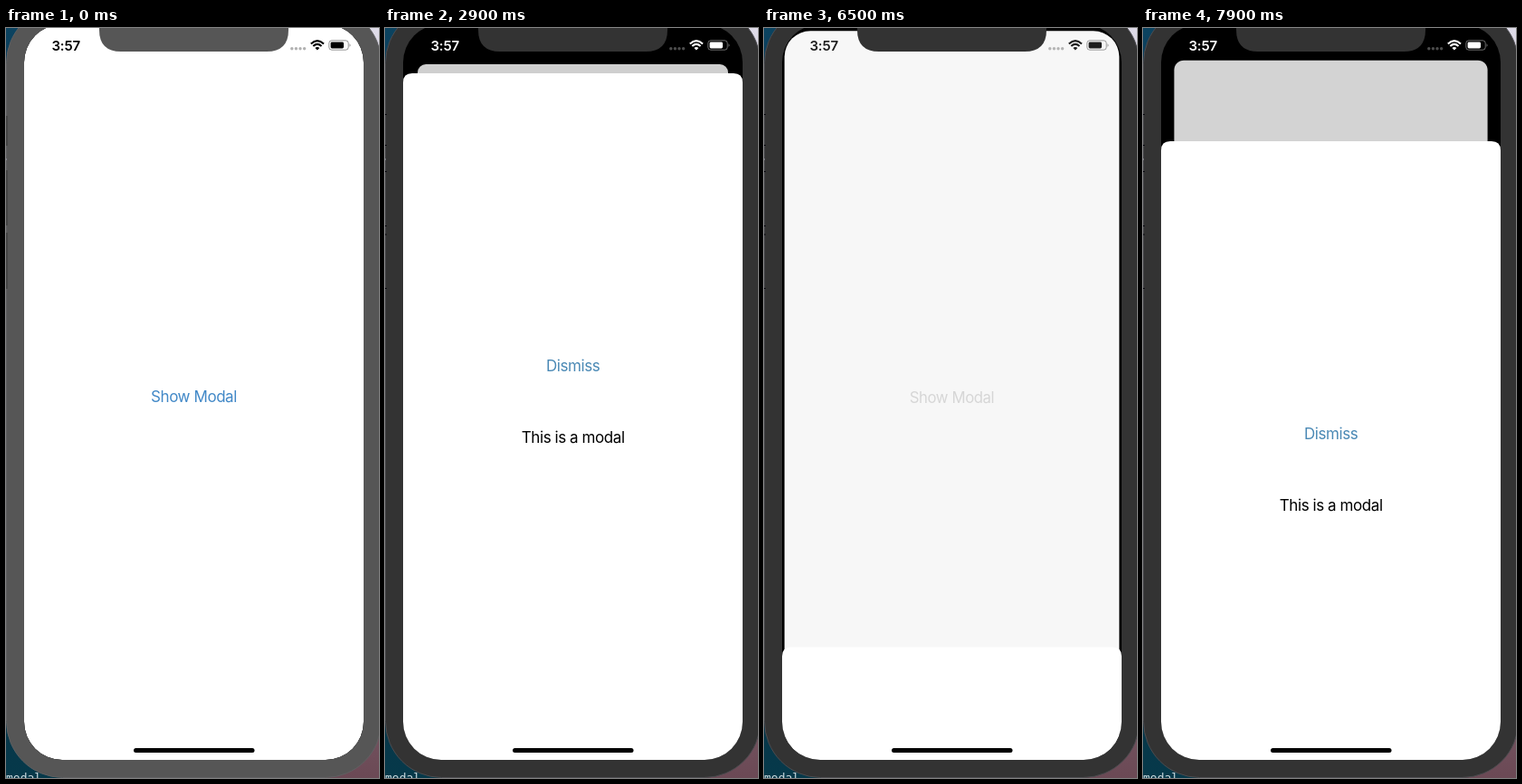
Write an HTML page that moves like this. It is 412x828 px and loops after 8000 ms.

```html
<!DOCTYPE html>
<html lang="en">
<head>
<meta charset="utf-8">
<title>Modal sheet</title>
<style>
  html, body { margin: 0; width: 100%; height: 100%; overflow: hidden; background: #0d4259; }
  svg { display: block; }
  text { font-family: Inter, Roboto, sans-serif; }
  .label { font-size: 17px; letter-spacing: -.43px; text-anchor: middle; }
  .clock { font-size: 15px; font-weight: 600; letter-spacing: -.2px; }
  .code { font: 13px "DejaVu Sans Mono", monospace; fill: #cfdde2; }
</style>
</head>
<body>
<svg width="412" height="828" viewBox="0 0 412 828">
  <defs>
    <linearGradient id="left" x2="0" y2="1">
      <stop offset="0" stop-color="#0b4360"/>
      <stop offset=".3" stop-color="#15264a"/>
      <stop offset="1" stop-color="#06394a"/>
    </linearGradient>
    <linearGradient id="right" x2="0" y2="1">
      <stop offset="0" stop-color="#dedbe8"/>
      <stop offset="1" stop-color="#6b4955"/>
    </linearGradient>
    <clipPath id="display"><rect x="20" y="-4" width="375" height="812" rx="42"/></clipPath>
  </defs>

  <rect width="206" height="828" fill="url(#left)"/>
  <rect x="206" width="206" height="828" fill="url(#right)"/>
  <text class="code" x="0" y="832">modal</text>

  <rect id="bezel" x=".5" y="-23.5" width="414" height="851" rx="62" stroke-width="1"/>
  <path id="keys" d="M1 97V130M1 157V218M1 226V288" stroke="#454545" stroke-width="2"/>
  <path id="ticks" d="M0 95.5H2M0 129.5H2M0 158.5H2M0 218.5H2M0 228H2M0 287.5H2" stroke="#0a0a10"/>
  <path d="M0 145H1" stroke="#aab"/>

  <g clip-path="url(#display)">
    <rect x="20" y="-4" width="375" height="812"/>
    <g id="card">
      <rect id="page" width="375" height="812"/>
      <text id="show" class="label" x="187.5" y="417">Show Modal</text>
    </g>
    <g id="sheet">
      <path d="M20 800V10Q20 0 30 0H385Q395 0 395 10V800Z" fill="#fff"/>
      <text id="dismiss" class="label" x="207.7" y="329" fill="#4a89b5">Dismiss</text>
      <text class="label" x="207.7" y="408">This is a modal</text>
    </g>
  </g>

  <path id="notch" d="M103 -2V2Q103 26 127 26H288Q312 26 312 2V-2Z"/>
  <g id="status">
    <text class="clock" x="50.5" y="24.5">3:57</text>
    <g opacity=".3">
      <circle cx="315.8" cy="22.7" r="1.7"/><circle cx="320.4" cy="22.7" r="1.7"/>
      <circle cx="325" cy="22.7" r="1.7"/><circle cx="329.6" cy="22.7" r="1.7"/>
    </g>
    <g fill="none" stroke="currentColor" stroke-width="2.1">
      <path d="M336.8 17.4Q343.9 10.8 351 17.4"/>
      <path d="M339.3 20Q343.9 15.9 348.5 20"/>
    </g>
    <path d="M341.4 22Q343.9 19.9 346.4 22L343.9 24.6Z"/>
    <rect x="356.8" y="13.8" width="21.4" height="10.4" rx="3" fill="none" stroke="currentColor" opacity=".42"/>
    <rect x="358.6" y="15.5" width="14.4" height="7" rx="1.4"/>
    <path d="M379.5 17.2Q381.8 19 379.5 20.8Z" opacity=".42"/>
  </g>
  <rect x="141" y="795" width="133.5" height="5" rx="2.5"/>
</svg>
<script>
const LOOP = 8000, STEP = 100;
const OPEN = [1743, 6453], CLOSE = 3930;
const BOTTOM = 808, TRAVEL = 758;

const $ = id => document.getElementById(id);
const set = (id, attrs) => {
  for (const [name, value] of Object.entries(attrs)) $(id).setAttribute(name, value);
};
const clamp = v => Math.min(1, Math.max(0, v));
const lerp = (a, b, k) => a + (b - a) * k;
const mix = (a, b, k) => `rgb(${a.map((v, i) => Math.round(lerp(v, b[i], k))).join()})`;
const ramp = (t, start, length) => clamp((t - start) / length);

// Critically damped spring
function spring(t, start) {
  const x = 15.4 * Math.max(0, t - start) / 1000;
  return x > 9.5 ? 1 : 1 - (1 + x) * Math.exp(-x);
}

// Adds the two openings and takes away the closing
const phase = (t, ease, closeEase = ease) =>
  ease(t, OPEN[0]) - closeEase(t, CLOSE) + ease(t, OPEN[1]);

function draw(t) {
  const drag = 75 * ramp(t, 7750, 150);
  const p = phase(t, spring) - drag / TRAVEL;
  const scale = lerp(1, 343 / 375, p);
  const shade = Math.round(255 * (1 - .19 * p));

  const active = t >= 1200;
  const body = active ? '#333' : '#565656';
  set('bezel', { fill: body, stroke: active ? '#4c4c50' : '#606062' });
  set('notch', { fill: body });
  set('keys', { visibility: active ? 'hidden' : 'visible' });
  set('ticks', { visibility: active ? 'visible' : 'hidden' });

  set('card', { transform: `translate(${207.5 - 187.5 * scale} ${lerp(-4, 40, p)}) scale(${scale})` });
  set('page', { fill: `rgb(${shade},${shade},${shade})`, rx: lerp(42, 10, Math.sqrt(clamp(p))) });
  set('sheet', {
    transform: `translate(0 ${BOTTOM - TRAVEL * p})`,
    visibility: p > .001 ? 'visible' : 'hidden'
  });

  const tint = phase(t, (time, s) => ramp(time, s, 40), (time, s) => ramp(time, s, 300));
  const pressed = OPEN.some(s => t < s && s - t < 60);
  set('show', { fill: pressed ? '#c9dbea' : mix([65, 136, 199], [214, 214, 214], tint) });
  set('dismiss', { opacity: t >= 3900 && t < 4000 ? .35 : 1 });

  const light = phase(t, (time, s) => ramp(time, s, 400), (time, s) => ramp(time, s, 300));
  const ink = mix([0, 0, 0], [255, 255, 255], light);
  set('status', { fill: ink, color: ink });
}

function tick() {
  const t = performance.now() % LOOP;
  draw(Math.floor(t / STEP) * STEP);
  requestAnimationFrame(tick);
}
tick();
</script>
</body>
</html>
```
